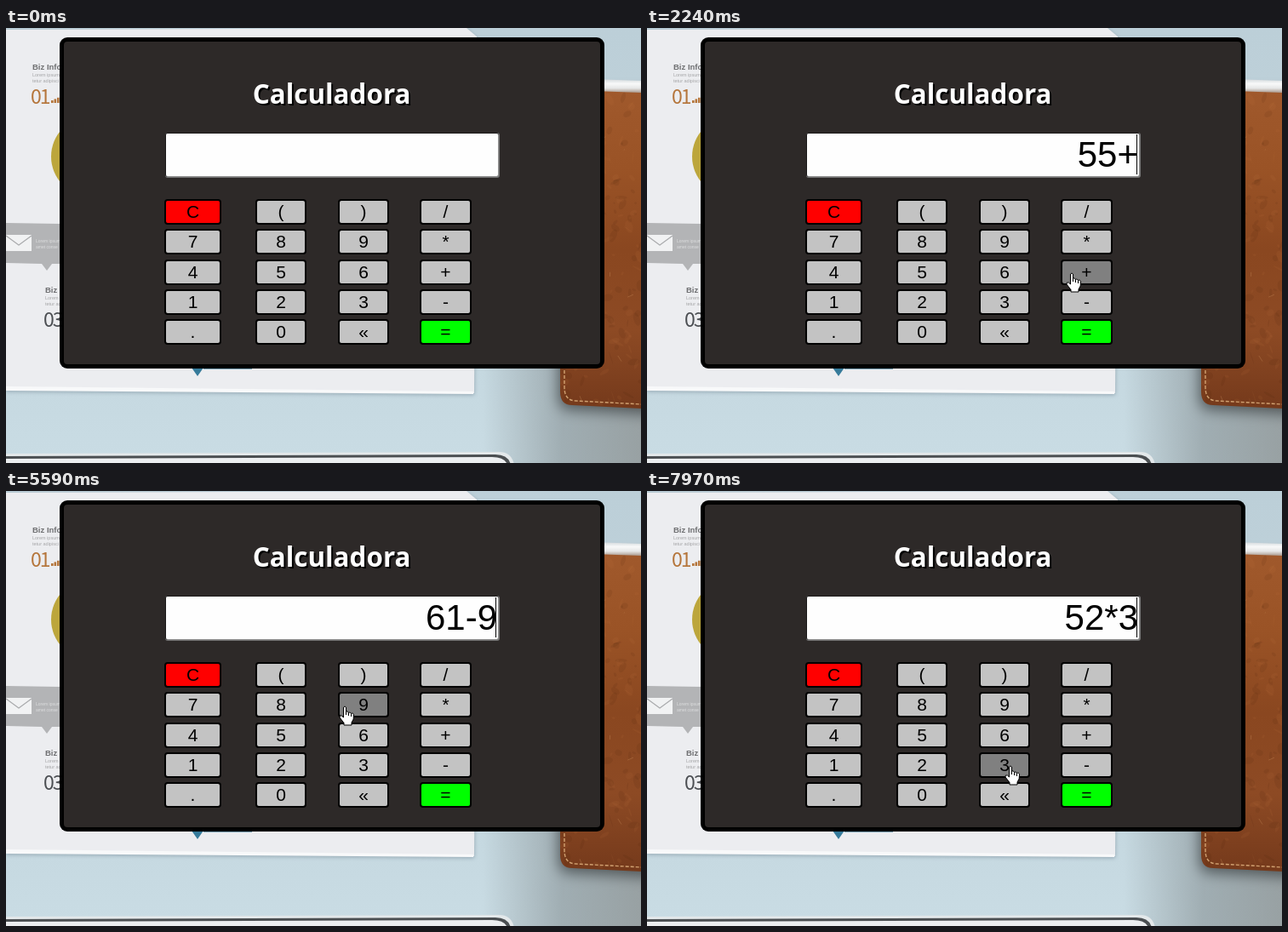
Write an HTML page with a canvas that moves like this. It is 746x511 px and loops after 8000 ms.

```html
<!DOCTYPE html>
<html lang="es">
<head>
<meta charset="utf-8">
<title>Calculadora</title>
<style>
html, body { margin: 0; width: 100%; height: 100%; overflow: hidden; background: #c8dae2; }
canvas { display: block; width: 746px; height: 511px; }
</style>
</head>
<body>
<canvas id="stage" width="746" height="511"></canvas>
<script>
const W = 746, H = 511, LOOP = 8000;
const TRAVEL = 300, SETTLE = 270, HOLD = 130, FADE = 200;
const ctx = document.getElementById('stage').getContext('2d');
const ARIAL = '"Liberation Sans", Arial, sans-serif';
const OPEN = '"Open Sans", "Noto Sans", sans-serif';
const CJK = '"Noto Sans CJK SC", "Noto Sans", sans-serif';

const COLS = [[186, 67], [293, 60], [390, 60], [486, 61]];
const KEYS = [...'C()/789*456+123-.0«='].map((label, i) => ({
  label, x: COLS[i % 4][0], w: COLS[i % 4][1],
  y: Math.round(201 + (i >> 2) * 35.25), h: 30
}));

// A press: time, key, offset of the tip from the key's centre
const press = (t, label, dx, dy) => {
  const k = KEYS.find(key => key.label === label);
  return { t, label, at: t - SETTLE, x: k.x + k.w / 2 + dx, y: k.y + k.h / 2 + dy };
};
const stop = (at, x, y) => ({ at, x, y });

const STEPS = [
  stop(200, 540, 473), stop(540, 124, 425), stop(940, 291, 296),
  press(1430, '5', 19, -7), press(1580, '5', 19, -7),
  press(2080, '+', 14, 2), press(2700, '6', 10, 0),
  stop(3010, 554, 373),
  press(3960, '=', 11, 7),
  stop(4230, 533, 331),
  press(4930, '-', 14, 2), press(5500, '9', -22, 2), press(6390, '=', 10, -5),
  press(7220, '*', -6, -1), press(7900, '3', 7, 1)
];
const PRESSES = STEPS.filter(s => s.label);

function evaluate(expr) {
  const [, a, op, b] = expr.match(/(\d+)(\D)(\d+)/);
  return String({ '+': +a + +b, '-': a - b, '*': a * b, '/': a / b }[op]);
}

PRESSES.reduce((shown, p) => p.shown = p.label === '=' ? evaluate(shown) : shown + p.label, '');

function poly(c, pts, fill) {
  c.beginPath();
  pts.forEach(([x, y]) => c.lineTo(x, y));
  c.closePath();
  c.fillStyle = fill;
  c.fill();
}

function box(c, x, y, w, h, r, fill) {
  c.beginPath();
  c.roundRect(x, y, w, h, r);
  c.fillStyle = fill;
  c.fill();
}

function text(c, s, x, y, font, fill, align = 'left') {
  c.font = font;
  c.fillStyle = fill;
  c.textAlign = align;
  c.fillText(s, x, y);
}

function ramp(c, x0, y0, x1, y1, ...colors) {
  const g = c.createLinearGradient(x0, y0, x1, y1);
  colors.forEach((col, i) => g.addColorStop(i / (colors.length - 1), col));
  return g;
}

function drawDesk(c) {
  c.fillStyle = ramp(c, 0, 0, 0, H, '#bccfd8', '#bfd1da', '#c3d6de', '#c9dce4');
  c.fillRect(0, 0, W, H);
  c.fillStyle = ramp(c, 560, 0, W, 0, 'rgba(120,128,130,0)', 'rgba(120,128,130,.5)', 'rgba(120,122,120,.6)');
  c.fillRect(560, 380, W - 560, H - 380);
}

function drawEntry(c, x, y, num, color) {
  text(c, 'Biz Info', x, y, `bold 9.5px ${ARIAL}`, '#6f7072');
  text(c, 'Lorem ipsum', x, y + 8, `5.5px ${ARIAL}`, '#a5a5a7');
  text(c, 'tetur adipisci', x, y + 15, `5.5px ${ARIAL}`, '#a5a5a7');
  c.letterSpacing = '-2px';
  text(c, num, x - 2, y + 40, `23px ${CJK}`, color);
  c.letterSpacing = '0px';
}

function drawPaper(c) {
  c.save();
  c.shadowColor = 'rgba(80,100,115,.45)';
  c.shadowBlur = 5;
  c.shadowOffsetY = 2;
  poly(c, [[0, 2], [541, 0], [553, 10], [550, 429], [0, 425]], '#ecedf0');
  c.restore();
  poly(c, [[0, 421], [549, 427], [549, 430], [0, 426]], '#f8f9fa');

  drawEntry(c, 31, 49, '01', '#b5763c');
  drawEntry(c, 46, 311, '03', '#4c4f53');
  c.fillStyle = '#b5763c';
  for (let i = 0; i < 4; i++) {
    const h = 3 + i * 1.6;
    c.fillRect(53 + i * 3.5, 88 - h, 2.6, h);
  }
  c.beginPath();
  c.arc(100, 151, 47, 0, 7);
  c.fillStyle = '#bca63c';
  c.fill();

  poly(c, [[0, 229], [64, 230], [64, 277], [54, 277], [48, 285], [42, 277], [0, 276]], '#b3b4b6');
  c.fillStyle = '#f1f2f3';
  c.fillRect(0, 243, 30, 19);
  c.beginPath();
  c.moveTo(0, 244);
  c.lineTo(15, 255);
  c.lineTo(30, 244);
  c.strokeStyle = '#a9aaac';
  c.lineWidth = 1.2;
  c.stroke();
  text(c, 'Lorem ipsum', 35, 252, `5px ${ARIAL}`, '#dedfe0');
  text(c, 'amet conse', 35, 259, `5px ${ARIAL}`, '#dedfe0');

  poly(c, [[218, 399], [232, 399], [225, 409]], '#367b9b');
  c.fillStyle = '#7ba3b5';
  c.fillRect(232, 399, 57, 2);
}

// Rounded lower-left corner shared by the leather and its seam
function walletEdge(c, top, inset) {
  const x = 651 + inset, y = 443 - inset;
  c.beginPath();
  c.moveTo(x, top);
  c.lineTo(x, y - 16);
  c.quadraticCurveTo(x, y, x + 14, y);
  c.lineTo(W + 20, y + 5);
}

function drawWallet(c) {
  c.save();
  c.shadowColor = 'rgba(45,50,52,.65)';
  c.shadowBlur = 16;
  c.shadowOffsetX = -2;
  c.shadowOffsetY = 6;
  walletEdge(c, 70, 0);
  c.lineTo(W + 20, 70);
  c.closePath();
  c.fillStyle = ramp(c, 0, 70, 0, 450, '#a0592c', '#9a5326', '#8a4720', '#8d4a24', '#74391b');
  c.fill();
  c.restore();

  c.save();
  c.clip();
  let seed = 11;
  const rnd = () => (seed = seed * 16807 % 2147483647) / 2147483647;
  c.strokeStyle = 'rgba(205,145,95,.4)';
  c.lineWidth = .8;
  for (let i = 0; i < 190; i++) {
    const x = 650 + rnd() * 96, y = 75 + rnd() * 365;
    c.beginPath();
    if (i % 13) {
      c.ellipse(x, y, 1 + rnd() * 7, .5 + rnd() * 4, rnd() * 3, 0, 7);
      c.fillStyle = rnd() < .5 ? 'rgba(60,25,8,.09)' : 'rgba(200,125,70,.09)';
      c.fill();
    } else {
      c.moveTo(x, y);
      c.lineTo(x + rnd() * 16 - 8, y + rnd() * 10);
      c.stroke();
    }
  }
  c.restore();

  walletEdge(c, 396, 5);
  c.setLineDash([4, 2]);
  c.lineWidth = 1.4;
  c.strokeStyle = '#d0a070';
  c.stroke();
  c.setLineDash([]);
  poly(c, [[690, 60], [W, 62], [W, 76], [690, 74]],
    ramp(c, 0, 60, 0, 76, '#d3d9dc', '#f8f9f9', '#e6e7e7', '#aa9a8e'));
}

// Nested lids: pale rim, dark gap, pale body
function drawLaptop(c) {
  ['#e3e8ea', '#4b4f52', '#eceef0'].forEach((fill, i) => {
    const y = 499 + i * 3, right = 597 - i * 4;
    c.beginPath();
    c.moveTo(0, y + 1);
    c.lineTo(right - 18, y - 1);
    c.quadraticCurveTo(right - 3, y - 1, right, H + 2);
    c.lineTo(0, H + 2);
    c.fillStyle = fill;
    c.fill();
  });
}

function drawPanel(c) {
  box(c, 63, 11, 640, 389, 9, '#000');
  box(c, 68, 16, 630, 379, 4, '#2d2928');
  c.save();
  c.shadowColor = '#000';
  c.shadowOffsetX = c.shadowOffsetY = 2;
  text(c, 'Calculadora', 382.6, 89, `bold 31.4px ${OPEN}`, '#fff', 'center');
  c.restore();
  box(c, 187, 123, 393, 53, 3, '#767676');
  box(c, 187, 123, 392, 52, 3, '#1c1a1a');
  box(c, 188, 124, 391, 51, 2, '#8c8c8c');
  box(c, 188, 124, 390, 50, 2, '#fefefe');
}

function makeScene() {
  const cv = document.createElement('canvas');
  cv.width = W;
  cv.height = H;
  const c = cv.getContext('2d');
  [drawDesk, drawPaper, drawWallet, drawLaptop, drawPanel].forEach(draw => draw(c));
  return cv;
}

function tipAt(t) {
  if (t < STEPS[0].at) return null;
  const i = STEPS.findIndex(s => s.at > t);
  if (i < 0) return STEPS[STEPS.length - 1];
  const a = STEPS[i - 1], b = STEPS[i];
  const start = Math.max(a.t || a.at, b.at - TRAVEL);
  const u = Math.min(1, Math.max(0, (t - start) / (b.at - start)));
  const e = u * u * (3 - 2 * u);
  return { x: a.x + (b.x - a.x) * e, y: a.y + (b.y - a.y) * e };
}

const inside = (k, p) => p && p.x >= k.x && p.x < k.x + k.w && p.y >= k.y && p.y < k.y + k.h;

// The hover fade is the share of recent time spent over the key
const hoverLevel = (k, trail) => trail.filter(p => inside(k, p)).length / trail.length;

function drawKey(k, level) {
  const gray = Math.round(195 - 67 * level);
  const fill = { C: '#f00', '=': '#0f0' }[k.label] || `rgb(${gray},${gray},${gray})`;
  box(ctx, k.x, k.y, k.w, k.h, 4, '#000');
  box(ctx, k.x + 2, k.y + 2, k.w - 4, k.h - 4, 2, fill);
  text(ctx, k.label, k.x + k.w / 2, k.y + 22, `21px ${ARIAL}`, '#000', 'center');
}

function drawDisplay(t) {
  const last = PRESSES.filter(p => p.t <= t).pop();
  if (!last) return;
  text(ctx, last.shown, 577, 163, `42px ${ARIAL}`, '#000', 'right');
  if (last !== PRESSES[0] && (t - last.t) % 1060 < 550) {
    ctx.fillStyle = '#000';
    ctx.fillRect(575, 125, 1, 47);
  }
}

function outline() {
  ctx.strokeStyle = '#000';
  ctx.lineWidth = 1;
  ctx.stroke();
}

function drawArrow() {
  poly(ctx, [[.5, .5], [.5, 16], [4, 12.8], [6.4, 18], [8.8, 17], [6.5, 11.8], [11.2, 11.8]], '#fff');
  outline();
}

function drawHand() {
  ctx.beginPath();
  ctx.moveTo(-1.5, 13);
  ctx.lineTo(-1.5, 1);
  ctx.quadraticCurveTo(0, -1, 1.5, 1);
  ctx.lineTo(1.5, 6);
  for (let i = 1; i < 4; i++) ctx.quadraticCurveTo(i * 3, 4 + i, 1.5 + i * 3, 6.3 + i);
  ctx.lineTo(10.2, 15);
  ctx.lineTo(8, 19);
  ctx.lineTo(8, 22);
  ctx.lineTo(-1, 22);
  ctx.lineTo(-1, 19.5);
  ctx.lineTo(-6, 13);
  ctx.quadraticCurveTo(-6.5, 10, -3.6, 11);
  ctx.closePath();
  ctx.fillStyle = '#fff';
  ctx.fill();
  for (let i = 0; i < 3; i++) {
    ctx.moveTo(1.5 + i * 3, 6 + i);
    ctx.lineTo(1.5 + i * 3, 10 + i);
  }
  outline();
}

function drawPointer(t, tip) {
  if (!tip) return;
  const x = Math.round(tip.x), y = Math.round(tip.y);
  if (PRESSES.some(p => t >= p.t - HOLD && t < p.t)) {
    ctx.beginPath();
    ctx.arc(x - 1, y, 15, 0, 7);
    ctx.fillStyle = 'rgba(180,172,0,.75)';
    ctx.fill();
  }
  ctx.save();
  ctx.translate(x, y);
  if (KEYS.some(k => inside(k, tip))) drawHand();
  else drawArrow();
  ctx.restore();
}

const scene = makeScene();

function frame(now) {
  const t = now % LOOP;
  const trail = Array.from({ length: 20 }, (_, i) => tipAt(t - i * FADE / 20));
  ctx.drawImage(scene, 0, 0);
  KEYS.forEach(k => drawKey(k, hoverLevel(k, trail)));
  drawDisplay(t);
  drawPointer(t, trail[0]);
  requestAnimationFrame(frame);
}
requestAnimationFrame(frame);
</script>
</body>
</html>
```
